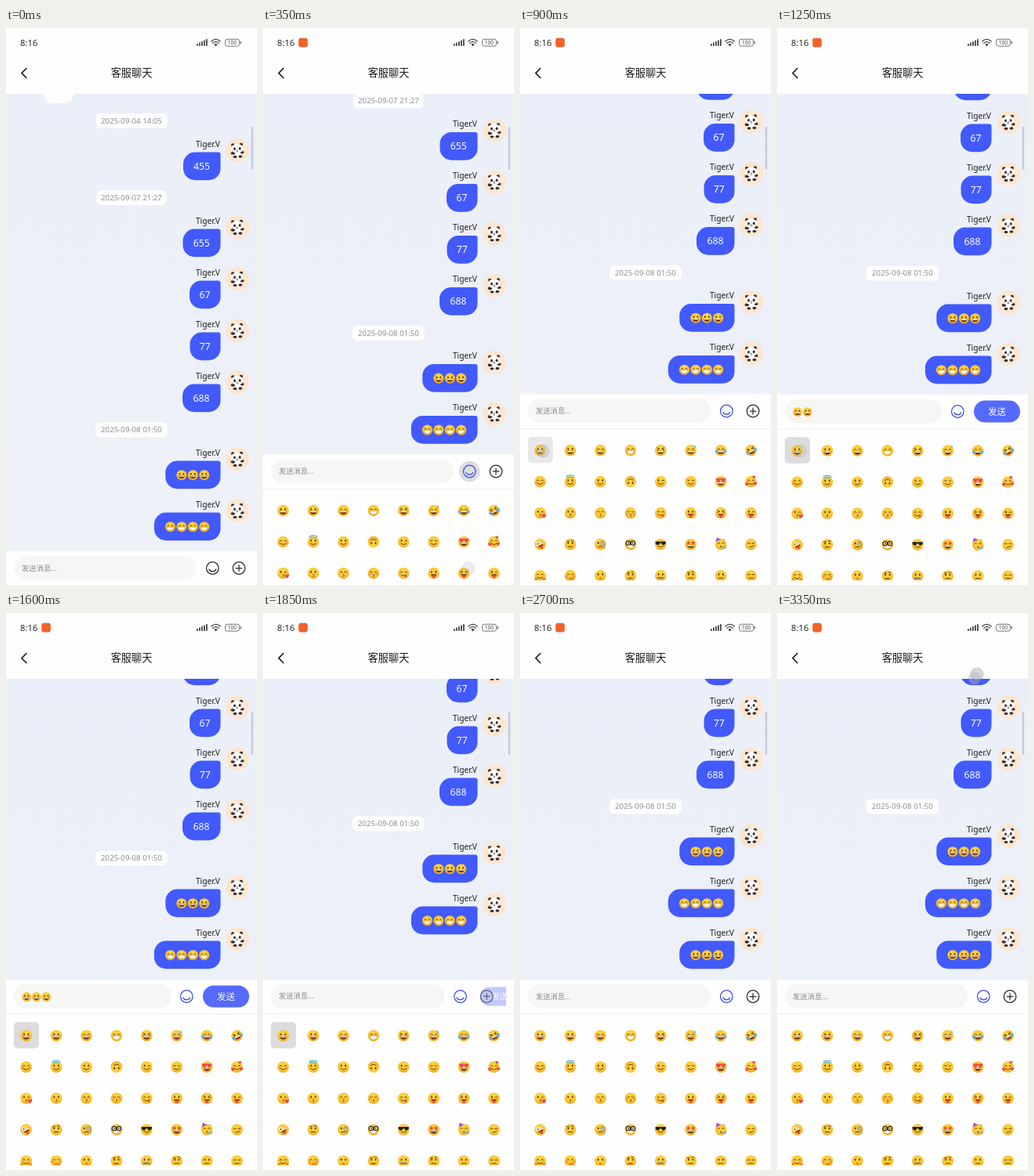
These frames come from a looping animation (320 px wide and 711 px high, 3.4 s). An HTML page:

```html
<!DOCTYPE html>
<html lang="zh">
<head>
<meta charset="utf-8">
<title>客服聊天</title>
<style>
html, body { margin: 0; width: 100%; height: 100%; overflow: hidden; background: #fefefe; }
svg { display: block; width: 100%; height: 100%; }
text { font-family: "Noto Sans", "Noto Sans CJK SC", "Noto Sans CJK", sans-serif; }
.zh { font-family: "Noto Sans CJK SC", "Noto Sans CJK", sans-serif; }
.mid { text-anchor: middle; }
.end { text-anchor: end; }
.line { fill: none; stroke-linecap: round; stroke-linejoin: round; }
</style>
</head>
<body>
<svg id="stage" viewBox="0 0 320 711" preserveAspectRatio="none"></svg>
<script>
const LOOP = 3400;
const NAME = 'Tiger.V';
const BLUE = '#425afb', INK = '#2a2a2c', BLACK = '#343132';
const BROWN = '#5b340f', RED = '#ee4452', HAND = '#e8941c';

// ---------- emoji, drawn around 0,0 with radius 10 ----------
const oval = (x, y, rx, ry, c = BROWN) => `<ellipse cx="${x}" cy="${y}" rx="${rx}" ry="${ry}" fill="${c}"/>`;
const fill = (d, c) => `<path d="${d}" fill="${c}"/>`;
const line = (d, c = BROWN, w = 1.3) => `<path class="line" d="${d}" stroke="${c}" stroke-width="${w}"/>`;
const heart = (x, y, s) => `<path transform="translate(${x} ${y}) scale(${s})" fill="${RED}" d="M0 3C-5-1-2.5-4 0-1.6C2.5-4 5-1 0 3Z"/>`;
const star = (x, y) => {
  let p = '';
  for (let i = 0; i < 10; i++) {
    const r = i % 2 ? 1.8 : 4, a = i * Math.PI / 5;
    p += `${(x + r * Math.sin(a)).toFixed(1)},${(y - r * Math.cos(a)).toFixed(1)} `;
  }
  return `<polygon points="${p}" fill="#e8472f"/>`;
};
const pair = f => f(-3.6) + f(3.6);
const happy = x => line(`M${x - 2} -1.6Q${x} -4.8 ${x + 2} -1.6`);

const EYES = {
  o: pair(x => oval(x, -2.2, 1.3, 1.9)),
  '^': pair(happy),
  u: pair(x => line(`M${x - 2} -2.4Q${x} .2 ${x + 2} -2.4`)),
  '>': line('M-5.8 -4.2L-2 -2.4L-5.8 -.6M5.8 -4.2L2 -2.4L5.8 -.6'),
  '-': pair(x => line(`M${x - 2} -1.8H${x + 2}`)),
  w: oval(-3.6, -2.2, 1.3, 1.9) + line('M1.8 -1.6Q3.8 -3.8 5.8 -1.6'),
  h: pair(x => heart(x * 1.15, -2.6, 1.4)),
  '*': pair(x => star(x * 1.1, -2.4)),
  a: oval(-3.6, -2.6, 3, 3, '#fff') + oval(-3.4, -2.4, 1.3, 1.3) + oval(3.8, -2, 2.2, 2.2, '#fff') + oval(4, -2, 1, 1),
  x: fill('M-9 -4.6H9V-2Q8 1.2 4.8 1.2Q1.6 1 1 -2H-1Q-1.6 1 -4.8 1.2Q-8 1.2 -9 -2Z', '#1d2025')
};
const MOUTHS = {
  D: fill('M-5.8 1H5.8Q5 6.8 0 6.8Q-5 6.8 -5.8 1Z', '#64300f') + fill('M-5.2 1.2H5.2L4.6 3.2H-4.6Z', '#fff') + oval(0, 5.9, 2, .7, '#d8503f'),
  g: fill('M-6.2 .8H6.2Q5.6 6.6 0 6.6Q-5.6 6.6 -6.2 .8Z', '#fff') + line('M-6.2 .8H6.2Q5.6 6.6 0 6.6Q-5.6 6.6 -6.2 .8Z', '#a9762a', .5),
  s: line('M-4.6 2.6Q0 6.6 4.6 2.6'),
  k: line('M-.6 1.8Q2.4 2 .6 3.7Q2.6 4.4 -.6 6', BROWN, 1.1),
  t: fill('M-5 1.6H5Q4.2 5 0 5Q-4.2 5 -5 1.6Z', '#64300f') + fill('M-2.6 3H2.6V6.4Q0 10.2 -2.6 6.4Z', RED),
  y: line('M-4.8 2.4Q0 6.4 4.8 2.4') + fill('M1.6 4.6L4.6 3Q6.8 6 4.4 6.8Q2.4 7 1.6 4.6Z', RED),
  f: line('M-3.6 4H3.6'),
  q: line('M-2 4.6Q2 4.8 4.4 2.4'),
  p: oval(0, 4, 1.4, 1.4),
  z: line('M-5.2 4H5.2', '#8e969e', 2.4) + line('M-4.4 3V5M-2 3V5M.4 3V5M2.8 3V5', '#444', .7),
  n: ''
};
const tear = x => `<ellipse cx="${x}" cy="2.4" rx="2" ry="3" fill="#46b5f0" transform="rotate(${x * 3} ${x} 2.4)"/>`;
const EXTRAS = {
  b: pair(x => oval(x * 1.75, 1.8, 2, 1.4, '#f2824f')),
  d: fill('M7 -9Q10 -4.6 7 -4.4Q4.4 -4.6 7 -9Z', '#49b6ee'),
  j: tear(-7.6) + tear(7.6),
  i: `<ellipse cx="0" cy="-9" rx="6.4" ry="2" fill="none" stroke="#42b4e4" stroke-width="1.5"/>`,
  l: heart(-7.4, 4.6, 1) + heart(7.4, 3.4, 1) + heart(5, -8, .9),
  v: heart(6.6, 5, 1.3),
  e: line('M-5.8 -5.2H-1.8M1.6 -6.2Q4 -8 6 -6', BROWN, 1.2),
  m: `<circle cx="3.8" cy="-1.8" r="3.6" fill="#dfe9ee" fill-opacity=".5" stroke="#666" stroke-width="1"/>` + line('M7 0V8', '#777', .8),
  n: pair(x => `<circle cx="${x * 1.15}" cy="-2" r="3.7" fill="#fff" fill-opacity=".25" stroke="#222" stroke-width="1.5"/>`),
  P: fill('M-9 -4L-7 -12L0 -8.4Z', '#a152d8') + oval(6, -8, 1, 1, '#39a9e8') + oval(8.6, 4, 1, 1, '#e8476a') + line('M1 4.5L8 7', '#3fb6dc', 1.8),
  H: pair(x => oval(x * 2, 6.6, 2.8, 3.4, HAND)),
  c: oval(1.4, 5.6, 4.4, 2.8, HAND),
  F: line('M0 3V9', HAND, 2.4) + oval(1, 8.4, 3.4, 2.2, HAND),
  T: line('M-5 7.4L2 5.4', HAND, 2.4) + oval(-3.6, 8, 3.4, 2.4, HAND)
};
// eyes, mouth, extras; R upside down, r tilted
const FACES = ('oD OD ^D ^g >D ^Dd ^Dj >Djr ' +
  '^sb osi os osR ws us hD ^sbl ' +
  'wkv ok ^k ukb ^y ot >t wt ' +
  'atr ofe ofm ogn xs *D ^pP -q ' +
  '^sH ^nbc opF ofeT oz ofe of -f').replace('O', 'o').split(' ');

function face(code, i) {
  const [eyes, mouth, ...extra] = code;
  const turn = extra.includes('R') ? 180 : extra.includes('r') ? -25 : 0;
  return `<g id="e${i}"><g transform="rotate(${turn})"><circle r="9.8" fill="url(#skin)"/>` +
    EYES[eyes] + MOUTHS[mouth] + extra.map(x => EXTRAS[x] || '').join('') + '</g></g>';
}
const emoji = (i, x, y, s, attr = '') => `<use href="#e${i}" transform="translate(${x} ${y}) scale(${s})" ${attr}/>`;

// ---------- chat list ----------
const text = (x, y, size, color, str, cls = '', attr = '') =>
  `<text x="${x}" y="${y}" font-size="${size}" fill="${color}" class="${cls}" ${attr}>${str}</text>`;
const rect = (x, y, w, h, r, c, attr = '') =>
  `<rect x="${x}" y="${y}" width="${w}" height="${h}" rx="${r}" fill="${c}" ${attr}/>`;

const PANDA = `<g id="panda"><circle r="15" fill="#fce6d0"/>` +
  oval(-5.8, -6.8, 2.2, 2.1, BLACK) + oval(4.8, -7.4, 2.2, 2.1, BLACK) +
  oval(.2, 4.6, 5.2, 4.4, '#fff') +
  oval(-5.6, 3.6, 2.8, 1.9, BLACK) + oval(6, 2.6, 2.6, 1.8, BLACK) +
  oval(-3, 8.2, 2.4, 1.7, BLACK) + oval(3.8, 7.8, 2.4, 1.7, BLACK) +
  oval(-.2, -2.4, 7.9, 5.9, '#fffdfb') +
  oval(-3.5, -2, 1.5, 1.8, BLACK) + oval(3.1, -2.3, 1.5, 1.8, BLACK) +
  oval(-.2, -.2, .9, .6, BLACK) + oval(-5.6, .6, 1.2, .7, '#f6b7ac') + oval(5.3, .3, 1.2, .7, '#f6b7ac') +
  line('M-1.4 1.3Q-.2 2.3 1 1.3', BLACK, .6) + '</g>';

const date = (y, w, str) => rect(160 - w / 2, y - 9.5, w, 19, 6, '#fdfdfe') + text(160, y + 3.4, 9.7, '#8d8f94', str, 'mid');

function message(y, left, body) {
  const inner = typeof body === 'string'
    ? text((left + 273) / 2, y + 22.4, 12.2, '#fff', body, 'mid')
    : body.map((e, i) => emoji(e, left + 20.6 + i * 14.4, y + 18.2, .67)).join('');
  return text(273, y - 6.8, 10.2, '#1f1f22', NAME, 'end') +
    `<path fill="${BLUE}" d="M${left + 15} ${y}H270.5Q273.5 ${y} 273.5 ${y + 3}V${y + 20.7}a15 15 0 0 1 -15 15H${left + 15}a15 15 0 0 1 -15 -15V${y + 15}a15 15 0 0 1 15 -15Z"/>` +
    inner + `<use href="#panda" x="295" y="${y - 2.3}"/>`;
}

const list =
  rect(47, 60, 40, 36, 14, '#fdfdfe') +
  date(118.5, 91, '2025-09-04 14:05') + message(158.5, 226, '455') +
  date(216.5, 89, '2025-09-07 21:27') + message(256.5, 225.5, '655') +
  message(322.5, 234, '67') + message(388.5, 234.5, '77') + message(454.5, 225, '688') +
  date(513, 92, '2025-09-08 01:50') +
  message(552.5, 203.3, [0, 0, 0]) + message(618.5, 188.9, [3, 3, 3, 3]) +
  `<g id="sent">${message(684.5, 203.3, [0, 0, 0])}</g>`;

// ---------- header ----------
const bars = [3, 4.5, 6, 7.6, 9].map((h, i) => rect(243 + i * 3, 23 - h, 1.8, h, .7, '#444')).join('');
const header = rect(0, 0, 320, 84, 0, '#fefefe') +
  text(18, 22.7, 11.3, '#2a2a2a', '8:16', '', 'font-weight="500"') +
  rect(45.3, 12.8, 11.6, 11.6, 3, '#f2622c', 'id="rec"') + bars +
  line('M261.8 17Q267.5 11.8 273.2 17M263.8 19.2Q267.5 16 271.2 19.2', '#444', 1.3) +
  fill('M265.3 21Q267.5 19.2 269.7 21L267.5 23.4Z', '#444') +
  `<rect x="279.5" y="14.3" width="18" height="8.8" rx="2.6" fill="none" stroke="#666" stroke-width=".9"/>` +
  rect(298.6, 17, 1.3, 3.4, .6, '#666') +
  text(288.5, 21.2, 6.6, '#444', '100', 'mid', 'font-weight="500"') +
  line('M26 51.5L20 57.6L26 63.7', '#1c1c1e', 1.6) +
  text(160, 62.3, 13.2, '#1c1c1e', '客服聊天', 'zh mid', 'font-weight="500"');

// ---------- input bar and emoji panel, y = 0 is the top of the bar ----------
const grid = FACES.map((f, i) => emoji(i, 25.7 + (i % 8) * 38.4, 71.5 + Math.floor(i / 8) * 40, .74)).join('');
const dock = rect(0, 0, 320, 260, 0, '#fefefe') +
  rect(10, 6, 233, 30.5, 15.2, '#f6f6f5', 'id="field"') +
  text(20, 24.5, 9.3, '#8b8b8d', '发送消息...', 'zh', 'id="hint"') +
  [0, 1, 2].map(i => emoji(0, 26.2 + i * 12.6, 22, .6, `id="typed${i}"`)).join('') +
  `<g id="smile"><circle id="halo" r="13.3" fill="#dcdde2"/><g id="smileInk" class="line" stroke-width="1.25">` +
  `<circle r="7.8"/><path d="M-4.4 1.4Q-3.2 4.2 0 4.2Q3.2 4.2 4.4 1.4"/></g></g>` +
  `<g clip-path="url(#slot)"><g id="send">${rect(-29.5, -14, 59, 28, 14, '#556afb')}${text(0, 4.1, 11.4, '#fff', '发送', 'zh mid', 'font-weight="500"')}</g></g>` +
  `<g id="plus" class="line" stroke="${INK}" stroke-width="1.25"><circle r="7.8"/><path d="M-3.8 0H3.8M0 -3.8V3.8"/></g>` +
  rect(0, 43.5, 320, .8, 0, '#ececee') +
  rect(10, 54.3, 32, 33.4, 5, '#dcdcdd', 'id="key"') + grid;

const touch = id => `<circle id="${id}" r="7.8" fill="#b4b4bc" stroke="#70707a" stroke-width=".8"/>`;

document.getElementById('stage').innerHTML =
  `<defs><radialGradient id="skin" cx=".5" cy=".38" r=".66"><stop offset="0" stop-color="#ffda45"/><stop offset=".65" stop-color="#fcc330"/><stop offset="1" stop-color="#ee9f1d"/></radialGradient>` +
  `<linearGradient id="wall" x2="0" y2="1"><stop stop-color="#ebeff9"/><stop offset="1" stop-color="#eef1f7"/></linearGradient>` +
  `<clipPath id="slot"><rect width="310" height="44"/></clipPath>` +
  `<clipPath id="screen"><rect width="320" height="705"/></clipPath>` +
  PANDA + FACES.map(face).join('') + '</defs>' +
  rect(0, 0, 320, 711, 0, '#fefefe') + rect(0, 84, 320, 590, 0, 'url(#wall)') +
  `<g id="list">${list}</g>` + rect(312.6, 126, 2.6, 55, 1.3, '#c8cbd6') + header +
  `<g clip-path="url(#screen)"><g id="dock">${dock}</g></g>` + touch('ghost') + touch('finger');

// ---------- motion ----------
const $ = {};
document.querySelectorAll('#stage [id]').forEach(n => $[n.id] = n);
const set = (id, attrs) => { for (const k in attrs) $[id].setAttribute(k, attrs[k]); };
const ramp = (t, a, b) => Math.min(1, Math.max(0, (t - a) / (b - a)));
const ease = p => 1 - (1 - p) ** 2;

function spring(ms) {
  if (ms <= 0) return 0;
  const a = ms * .00673, k = 1.288;
  return 1 - Math.exp(-k * a) * (Math.cos(a) + k * Math.sin(a));
}

// start, end, x, y of each tap
const TAPS = [[80, 370, 262, 690], [850, 960, 29, 540], [1160, 1280, 30, 540], [1430, 1530, 30, 540], [1630, 1760, 283, 490], [3340, 3400, 255, 78]];
const TYPED = [920, 1210, 1490];
const SEND = 1720, DRAG = 3340;

function draw(t) {
  const lift = 200 * spring(t - 186);
  const scroll = 66 * ease(ramp(t, SEND, 2030));
  set('list', { transform: `translate(0 ${-lift - scroll})` });
  set('sent', { opacity: ramp(t, 1880, 2150) });
  set('dock', { transform: `translate(0 ${668 - lift})` });
  set('rec', { opacity: ramp(t, 100, 250) });

  // 0 shows the plus icon, 1 the send button
  const s = t < SEND ? ease(ramp(t, 920, 1120)) : (1 - ramp(t, SEND, 2020)) ** 1.8;
  set('field', { width: 233 - 32 * s });
  set('smile', { transform: `translate(${263.3 - 33 * s} 21.5)` });
  set('smileInk', { stroke: t < 200 ? INK : '#3b50e0' });
  set('halo', { opacity: ramp(t, 100, 200) * (1 - .4 * ramp(t, 400, 650)) * (1 - ramp(t, 650, 800)) });
  set('plus', { transform: `translate(${297 - 33 * s} 21.5)`, opacity: 1 - s });
  set('send', { transform: `translate(${313.5 - 33 * s} 21.5) scale(${.78 + .22 * s})`, opacity: s });

  const count = t < SEND ? TYPED.filter(x => t >= x).length : 0;
  for (let i = 0; i < 3; i++) set('typed' + i, { opacity: i < count ? 1 : 0 });
  set('hint', { opacity: count ? 0 : 1 });
  set('key', { opacity: ramp(t, 870, 920) * (1 - ramp(t, 1900, 2100)) });

  const tap = TAPS.find(p => t >= p[0] && t < p[1]);
  const drag = t >= DRAG;
  if (tap) set('finger', { cx: tap[2], cy: tap[3] });
  set('finger', { opacity: !tap ? 0 : drag ? .5 : .36 * (1 - .5 * ramp(t, tap[1] - 60, tap[1])) });
  set('ghost', { cx: 252, cy: 84, opacity: drag ? .4 : 0 });
}

const start = performance.now();
function tick() {
  draw((performance.now() - start) % LOOP);
  requestAnimationFrame(tick);
}
draw(0);
tick();
</script>
</body>
</html>
```
